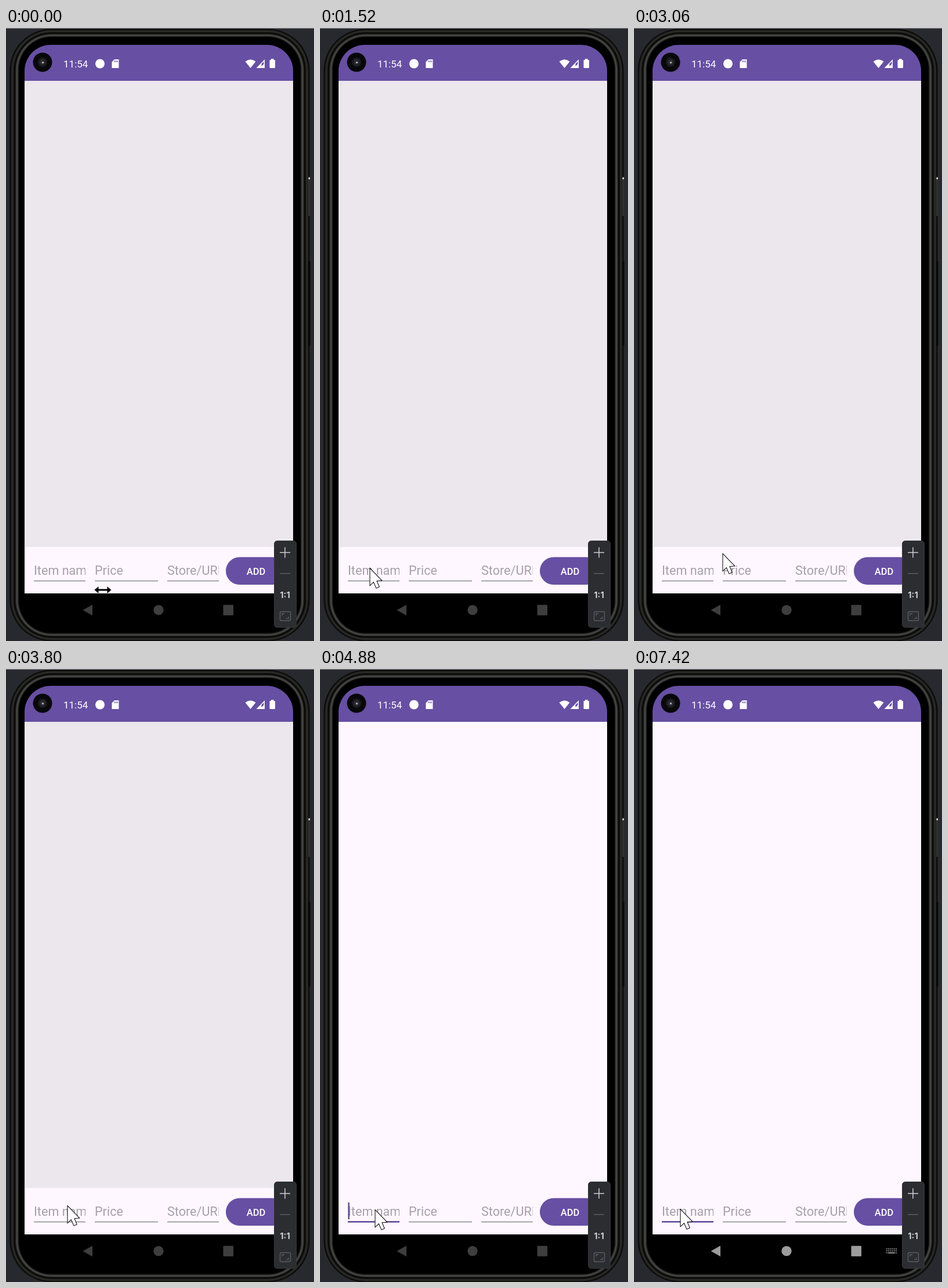
Animation, 531 px wide and 1056 px high, one loop 8 s. Source, as an HTML page with a canvas:

```html
<!DOCTYPE html>
<html lang="en">
<head>
<meta charset="utf-8">
<title>Phone emulator</title>
<style>
html, body { margin: 0; width: 100%; height: 100%; overflow: hidden; background: #28292e; }
canvas { display: block; width: 531px; height: 1056px; }
</style>
</head>
<body>
<canvas id="stage"></canvas>
<script>
const W = 531, H = 1056, LOOP = 8000;
const PURPLE = '#674fa3', PAPER = '#fef7ff', TOOL = '#5a5c62';
const TICK = 68; // the pointer is redrawn at this pace
const ARROW_AT = 1440, FOCUS_AT = 3870, KEYBOARD_AT = 6820;
const CARET_START = 3880, BLINK = 500;

const canvas = document.getElementById('stage');
const dpr = window.devicePixelRatio || 1;
canvas.width = W * dpr;
canvas.height = H * dpr;
const c = canvas.getContext('2d');

// The pointer glides to (x, y), bowed sideways by (dx, dy) halfway.
function pointerAt(t) {
  let x = 167, y = 968;
  function glide(start, end, toX, toY, dx = 0, dy = 0) {
    if (t < start) return;
    const steps = Math.round((end - start) / TICK) + 1;
    const gap = (end - start) / Math.max(1, steps - 1) || 1;
    const u = Math.min(1, (Math.floor((t - start) / gap + 0.001) + 1) / steps);
    const bow = Math.sin(Math.PI * u);
    x += (toX - x) * u + dx * bow;
    y += (toY - y) * u + dy * bow;
  }
  glide(70, 200, 88, 950);
  glide(360, 1110, 86, 929, -14, -8);
  glide(1180, 1520, 86, 931, 0, -10);
  glide(2110, 2580, 72, 919, 8, 6);
  glide(2720, 2720, 85, 919);
  glide(3060, 3060, 153, 906);
  glide(3130, 3800, 106, 925, -55, 26);
  glide(3870, 4480, 95, 932, 8, -8);
  glide(5210, 5340, 80, 931);
  return [Math.round(x), Math.round(y)];
}

function rect(x, y, w, h, color) {
  c.fillStyle = color;
  c.fillRect(x, y, w, h);
}
function paint(fill, stroke, line) {
  if (stroke) { c.strokeStyle = stroke; c.lineWidth = line; c.stroke(); }
  if (fill) { c.fillStyle = fill; c.fill(); }
}
function round(x, y, w, h, r, fill, stroke, line = 1) {
  c.beginPath();
  c.roundRect(x, y, w, h, r);
  paint(fill, stroke, line);
}
function disc(x, y, r, fill) {
  c.beginPath();
  c.arc(x, y, r, 0, Math.PI * 2);
  paint(fill);
}
function poly(points, fill, stroke, line = 1) {
  c.beginPath();
  points.forEach(([x, y]) => c.lineTo(x, y));
  c.closePath();
  paint(fill, stroke, line);
}
function text(str, x, y, font, color, align = 'left') {
  c.font = font;
  c.fillStyle = color;
  c.textAlign = align;
  c.fillText(str, x, y);
}

function drawBody() {
  rect(0, 0, W, H, '#28292e');
  rect(0, 0, W, 1, '#8b8b90');
  // Two metal bands, the inner one brighter, fading into the black bezel.
  for (let d = 0; d <= 16; d += 0.5) {
    const v = Math.round(8 + (22 + 3.5 * d) * Math.sin(Math.PI * d / 8) ** 2);
    round(6.5 + d, 1.5 + d * 0.9, 517 - 2 * d, 1055 - 1.8 * d, 72 - d, `rgb(${v},${v},${v - 2})`);
  }
  round(22.5, 16, 485, 1025, 55, '#000');
  round(521, 256, 3.5, 68, 1.5, '#30302f');
  round(521, 401, 3.5, 146, 1.5, '#080808');
  rect(521.5, 257.5, 2.5, 3, '#e4e4de');
}

function drawStatusBar() {
  rect(32, 29, 463, 62, PURPLE);
  disc(63, 59, 16.5, '#08080a');
  disc(63, 59, 8, '#1b1b1f');
  disc(63, 59, 5, '#2a2a31');
  disc(63.5, 59.5, 1.7, '#a9aab4');
  text('11:54', 99, 68, '17px Roboto, sans-serif', '#fff');
  disc(162, 61.5, 8, '#fff');
  poly([[187, 54], [194.5, 54], [194.5, 69], [182.5, 69], [182.5, 58.5]], '#fff');
  for (let i = 0; i < 3; i++) rect(186.5 + i * 2.5, 56, 1.2, 3, PURPLE);

  c.beginPath();
  c.moveTo(421.5, 69);
  c.lineTo(412.5, 57.8);
  c.quadraticCurveTo(421.5, 50.5, 430.5, 57.8);
  paint('#fff');
  poly([[446, 54], [446, 69], [431.5, 69]], '#fff');
  poly([[444.5, 57.8], [444.5, 62], [440.5, 66], [440.5, 61.8]], PURPLE);
  round(454.5, 55, 9.5, 14, 1.2, '#fff');
  rect(457, 53, 4.5, 2.5, '#fff');
}

function drawField(label, x, w, focused) {
  c.save();
  c.beginPath();
  c.rect(x, 915, w, 45);
  c.clip();
  text(label, x, 942, '21.6px Roboto, sans-serif', '#a6a1a8');
  c.restore();
  if (focused) rect(x, 951, w, 2.6, '#624c99');
  else rect(x, 951.9, w, 1.2, '#77727a');
}

function drawApp(focused) {
  rect(32, 91, 463, 883, PAPER);
  if (!focused) rect(32, 91, 463, 803, '#ebe7ec');
  drawField('Item name', 48, 89, focused);
  drawField('Price', 153, 109, false);
  drawField('Store/URL', 278, 89, false);
  round(379, 911.5, 104, 47.5, 23.7, PURPLE);
  text('ADD', 431, 942, '500 16.5px Roboto, sans-serif', '#fff', 'center');
}

function drawNav(bright) {
  const color = bright ? '#9c9c9c' : '#3e3e3e';
  rect(32, 974, 463, 54, '#000');
  poly([[132.5, 1002.8], [149, 993.5], [149, 1012]], color);
  disc(263, 1002.6, 8.7, color);
  round(374.5, 993.8, 17.5, 18, 1.2, color);
  if (!bright) return;
  for (let row = 0; row < 3; row++)
    for (let i = 0; i < 6; i++) rect(435 + i * 3.2, 998 + row * 3.4, 1.8, 1.8, color);
  rect(438.2, 1004.8, 11.4, 1.8, color);
}

function drawTools() {
  round(462.5, 883.5, 38, 149, 5, '#2b2d30', '#43454a');
  rect(472, 902.8, 18, 1.5, '#ced0d6');
  rect(480.2, 894.5, 1.5, 18, '#ced0d6');
  rect(472, 939, 18, 1.5, TOOL);
  text('1:1', 481, 982, '600 15px Inter, sans-serif', '#dfe1e5', 'center');
  round(472.5, 1005.5, 18, 15.5, 2, null, TOOL, 1.4);
  for (const side of [-1, 1]) {
    c.beginPath();
    c.moveTo(481.5 + side * 5.5, 1013.2 + side);
    c.lineTo(481.5 + side * 5.5, 1013.2 + side * 4.2);
    c.lineTo(481.5 + side * 1.5, 1013.2 + side * 4.2);
    paint(null, TOOL, 1.4);
  }
}

function drawPointer(x, y, arrow) {
  c.save();
  c.translate(x, y);
  if (arrow) {
    poly([[0.5, 0.8], [0.5, 28.5], [6.6, 22.8], [11.2, 33.4], [15.6, 31.5],
      [11.2, 21.2], [19.7, 20.4]], '#fff', '#000', 2);
  } else {
    const half = [[-14.5, 0], [-7.5, -6], [-7.5, -1.5], [7.5, -1.5], [7.5, -6]];
    poly([...half, ...half.map(([px, py]) => [-px, -py])], '#000', '#fff', 1);
  }
  c.restore();
}

function draw(t) {
  c.setTransform(dpr, 0, 0, dpr, 0, 0);
  drawBody();
  c.save();
  c.beginPath();
  c.roundRect(32, 29, 463, 1000, 45);
  c.clip();
  drawStatusBar();
  drawApp(t >= FOCUS_AT);
  drawNav(t >= KEYBOARD_AT);
  c.restore();
  const blink = t - CARET_START;
  if (blink >= 0 && blink % (2 * BLINK) < BLINK) rect(48.3, 919, 2.5, 29, '#5f4c8e');
  drawTools();
  drawPointer(...pointerAt(t), t >= ARROW_AT);
}

const begin = performance.now();
function tick() {
  draw((performance.now() - begin) % LOOP);
  requestAnimationFrame(tick);
}
tick();
</script>
</body>
</html>
```
